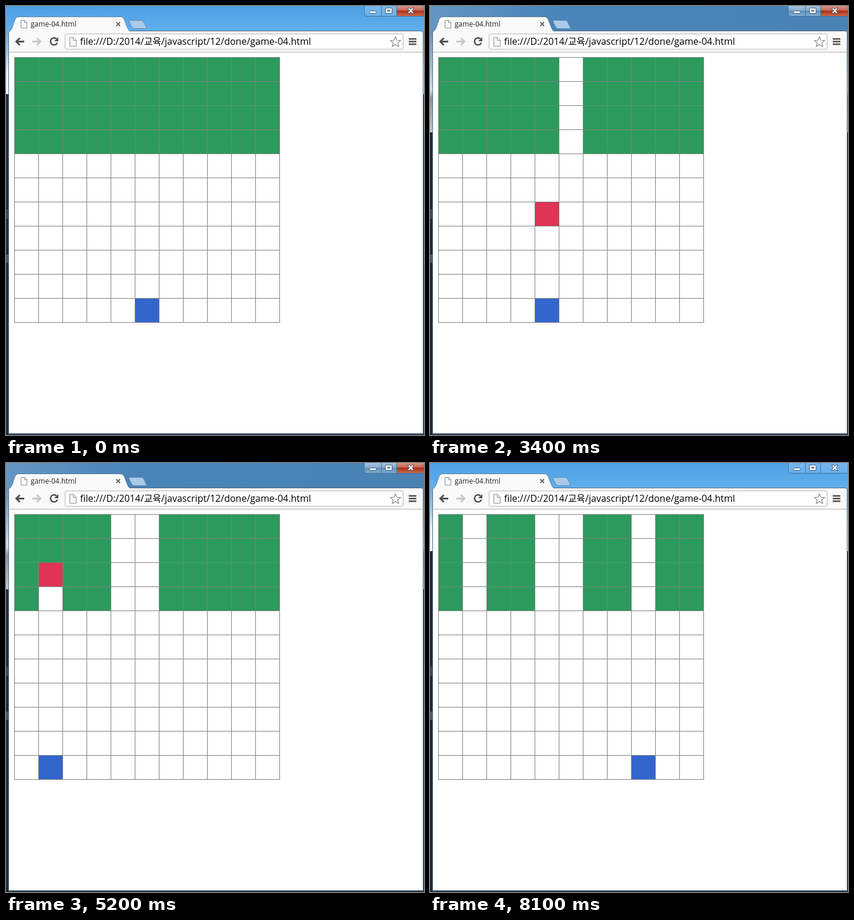
An HTML page that plays this animation: 711x730 px, repeating every 8200 ms.

```html
<!DOCTYPE html>
<html lang="ko">
<head>
<meta charset="utf-8">
<title>game-04.html</title>
<style>
  html, body { margin: 0; width: 100%; height: 100%; overflow: hidden; }
  svg { display: block; width: 711px; height: 730px; }
  text { font-family: "Open Sans", "Noto Sans CJK KR", "Noto Sans CJK", sans-serif; white-space: pre; }
</style>
</head>
<body>
<svg viewBox="0 0 711 730" xmlns="http://www.w3.org/2000/svg">
  <defs>
    <linearGradient id="sky" x2="0" y2="1">
      <stop offset="0" stop-color="#4f9fe2"/><stop offset="1" stop-color="#60b0ef"/>
    </linearGradient>
    <linearGradient id="steel">
      <stop offset="0" stop-color="#6496c2"/><stop offset=".3" stop-color="#4a84b8"/>
      <stop offset="1" stop-color="#4a82b4"/>
    </linearGradient>
    <linearGradient id="skySide" x2="0" y2="1">
      <stop offset="0" stop-color="#60b0ef"/><stop offset=".3" stop-color="#8cc6f3"/>
      <stop offset=".65" stop-color="#e4f1fb"/><stop offset="1" stop-color="#f4f8fb"/>
    </linearGradient>
    <linearGradient id="steelSide" x2="0" y2="1">
      <stop offset="0" stop-color="#5c92c0"/><stop offset=".35" stop-color="#9fc0dc"/>
      <stop offset=".58" stop-color="#d3dfe9"/><stop offset=".66" stop-color="#8f9499"/>
      <stop offset="1" stop-color="#c4c4c4"/>
    </linearGradient>
    <linearGradient id="bar" x2="0" y2="1">
      <stop offset="0" stop-color="#fafafa"/><stop offset="1" stop-color="#e4e4e4"/>
    </linearGradient>
    <linearGradient id="glass" x2="0" y2="1">
      <stop offset="0" stop-color="#a9c6e0"/><stop offset=".48" stop-color="#86acd0"/>
      <stop offset=".5" stop-color="#5f90bd"/><stop offset="1" stop-color="#7fadd3"/>
    </linearGradient>
    <linearGradient id="paleGlass" x2="0" y2="1">
      <stop offset="0" stop-color="#78b7ec"/><stop offset="1" stop-color="#68b0ec"/>
    </linearGradient>
    <linearGradient id="closeRed" x2="0" y2="1">
      <stop offset="0" stop-color="#dd9c8c"/><stop offset=".48" stop-color="#c4604e"/>
      <stop offset=".5" stop-color="#ab2d1c"/><stop offset="1" stop-color="#cf6a4c"/>
    </linearGradient>
  </defs>

  <rect width="711" height="730" fill="#1e2b39"/>
  <g id="idle">
    <rect width="711" height="43" fill="url(#sky)"/>
    <rect y="42" width="711" height="108" fill="url(#skySide)"/>
  </g>
  <g id="focused">
    <rect width="711" height="43" fill="url(#steel)"/>
    <rect y="42" width="711" height="173" fill="url(#steelSide)"/>
  </g>
  <g fill="#5d6f7f">
    <rect y="346" width="4" height="16" opacity=".5"/>
    <rect y="423" width="4" height="14" opacity=".7"/>
  </g>

  <!-- window buttons -->
  <g stroke="#44719c">
    <path id="buttons" d="M609.500 -1V13Q609.500 17.500 614 17.500H665V-1Z"/>
    <path id="close" d="M664.500 -1V17.500H711V-1Z"/>
    <path d="M638.500 0V17"/>
  </g>
  <g fill="#fff" stroke="#4b5a6a">
    <rect x="618.500" y="8.500" width="11" height="4" rx="1"/>
    <path fill-rule="evenodd" d="M645.500 3.500H656.500V12.500H645.500ZM649 7H653V9H649Z"/>
    <path d="M683 3.500H686.500L688.500 6L690.500 3.500H694L690.700 8L694 12.500H690.500L688.500 10L686.500 12.500H683L686.300 8Z"/>
  </g>

  <!-- tabs and toolbar -->
  <path d="M4.500 728V46Q4.500 42.500 9 42.500H705Q709.500 42.500 709.500 46V728Z" fill="url(#bar)" stroke="#53687c"/>
  <path d="M5 43.500C9 42 10 39 12 33L15 24Q17 18.500 22 18.500H194Q199 18.500 201 23L206 36C208 41 209 42 212 43.500Z" fill="#fafafa"/>
  <path d="M5 42.500C9 42 10 39 12 33L15 24Q17 18.500 22 18.500H194Q199 18.500 201 23L206 36C208 41 209 42.500 212 42.500" fill="none" stroke="#52708d" stroke-opacity=".75"/>
  <path d="M211 24.500H230Q233 24.500 234 27L238.500 36Q239.500 38.500 237 38.500H218Q215 38.500 214 36L209.500 27Q208.500 24.500 211 24.500Z" fill="#a9cae8" stroke="#5c87ae"/>
  <path id="page" d="M25.500 24.500H32L35.500 28V37.500H25.500ZM31.500 24.500V28.500H35.500" fill="#fff" stroke="#8d8d8d"/>
  <text x="42" y="35" font-size="12" fill="#222">game-04.html</text>
  <path d="M187.500 27.500L194 34M194 27.500L187.500 34" stroke="#606060" stroke-width="1.800"/>
  <path id="arrow" d="M31 60.500H18M23.500 54.500L17.500 60.500L23.500 66.500" fill="none" stroke="#505050" stroke-width="3"/>
  <path d="M45 60.500H58M52.500 54.500L58.500 60.500L52.500 66.500" fill="none" stroke="#c6c6c6" stroke-width="3"/>
  <path d="M86 56A6 6 0 1 0 87.300 62.500" fill="none" stroke="#505050" stroke-width="2.500"/>
  <path d="M89 53V60H82Z" fill="#505050"/>
  <rect x="100.500" y="47.500" width="575" height="26" rx="2.500" fill="#fff" stroke="#b4b4b4"/>
  <path d="M108.500 53.500H115L119.500 58V68.500H108.500ZM114.500 53.500V58.500H119.500" fill="#f7f7f7" stroke="#8d8d8d"/>
  <text x="126" y="66" font-size="16" fill="#000">file:///D:/2014/교육/javascript/12/done/game-04.html</text>
  <path id="star" fill="#fff" stroke="#8a8a8a" stroke-width="1.200" stroke-linejoin="round"/>
  <path d="M685 56H698M685 60.500H698M685 65H698" stroke="#4c4c4c" stroke-width="2.600"/>
  <rect x="5" y="78" width="704" height="1" fill="#b0b0b0"/>
  <rect x="5" y="79" width="704" height="648" fill="#fff"/>
  <path d="M4 727.500H710" stroke="#65788a"/>

  <g id="cells" shape-rendering="crispEdges"></g>
  <g id="lines" shape-rendering="crispEdges"></g>
  <g id="seams" shape-rendering="crispEdges"></g>
  <rect id="shot" width="40" height="40" fill="#de3455" shape-rendering="crispEdges"/>
  <rect id="player" y="498" width="40" height="40" fill="#3366cc" shape-rendering="crispEdges"/>
</svg>
<script>
const LOOP = 8200, TICK = 100, STEP = 41, SIZE = 11, WALL_ROWS = 4;
const $ = id => document.getElementById(id);
const cellX = c => 15 + STEP * c;
const cellY = r => 88 + STEP * r;

// [time, column]
const moves = [[0, 5], [2800, 4], [4000, 3], [4100, 2], [4300, 1], [5400, 2],
  [5700, 4], [5900, 5], [6000, 6], [6100, 7], [6200, 8]];
// the last shot drops one row at its skip time
const shots = [
  { start: 1700, col: 5 }, { start: 3200, col: 4 },
  { start: 4600, col: 1 }, { start: 6500, col: 8, skip: 7000 }
];

function rect(parent, x, y, width, height, fill) {
  const el = document.createElementNS("http://www.w3.org/2000/svg", "rect");
  Object.entries({ x, y, width, height, fill }).forEach(([k, v]) => el.setAttribute(k, v));
  return parent.appendChild(el);
}

const wall = [], seams = [];
for (let r = 0; r < WALL_ROWS; r++) {
  for (let c = 0; c < SIZE; c++) {
    wall.push({ r, c, el: rect($("cells"), cellX(c), cellY(r), 40, 40, "#2c9a5c") });
    if (c % 2) seams.push({ a: [r, c - 1], b: [r, c], el: rect($("seams"), cellX(c) - 1, cellY(r), 1, 40, "#489f6c") });
    if (r === 2) seams.push({ a: [1, c], b: [2, c], el: rect($("seams"), cellX(c), cellY(r) - 1, 40, 1, "#489f6c") });
  }
}
for (let i = 0; i <= SIZE; i++) {
  rect($("lines"), 14 + STEP * i, 87, 1, 452, "#808080");
  rect($("lines"), 14, 87 + STEP * i, 452, 1, "#808080");
}

const starPoints = Array.from({ length: 10 }, (_, i) => {
  const a = i * Math.PI / 5 - Math.PI / 2, r = i % 2 ? 4 : 9.3;
  return `${662.500 + r * Math.cos(a)} ${61.500 + r * Math.sin(a)}`;
});
$("star").setAttribute("d", `M${starPoints.join("L")}Z`);

function shotRow(shot, t) {
  if (t < shot.start) return SIZE;
  return 8 - Math.floor((t - shot.start) / TICK) - (t >= shot.skip ? 1 : 0);
}

const show = (el, on) => el.setAttribute("visibility", on ? "visible" : "hidden");

function render(time) {
  const t = Math.floor((time % LOOP) / TICK) * TICK;
  const focused = t >= 400 && t < 8100;
  show($("focused"), focused);
  show($("idle"), !focused);
  const glass = focused ? "url(#glass)" : "url(#paleGlass)";
  $("buttons").setAttribute("fill", glass);
  $("close").setAttribute("fill", focused || t < 100 ? "url(#closeRed)" : glass);

  const col = moves.filter(m => m[0] <= t).pop()[1];
  $("player").setAttribute("x", cellX(col));

  const rows = shots.map(s => ({ col: s.col, row: shotRow(s, t) }));
  const live = rows.find(s => s.row >= 0 && s.row < SIZE);
  show($("shot"), live);
  if (live) {
    $("shot").setAttribute("x", cellX(live.col));
    $("shot").setAttribute("y", cellY(live.row));
  }

  const solid = (r, c) => !rows.some(s => s.col === c && s.row <= r);
  wall.forEach(w => show(w.el, solid(w.r, w.c)));
  seams.forEach(s => show(s.el, solid(...s.a) && solid(...s.b)));
}

const begin = performance.now();
function frame() {
  render(performance.now() - begin);
  requestAnimationFrame(frame);
}
frame();
</script>
</body>
</html>
```
